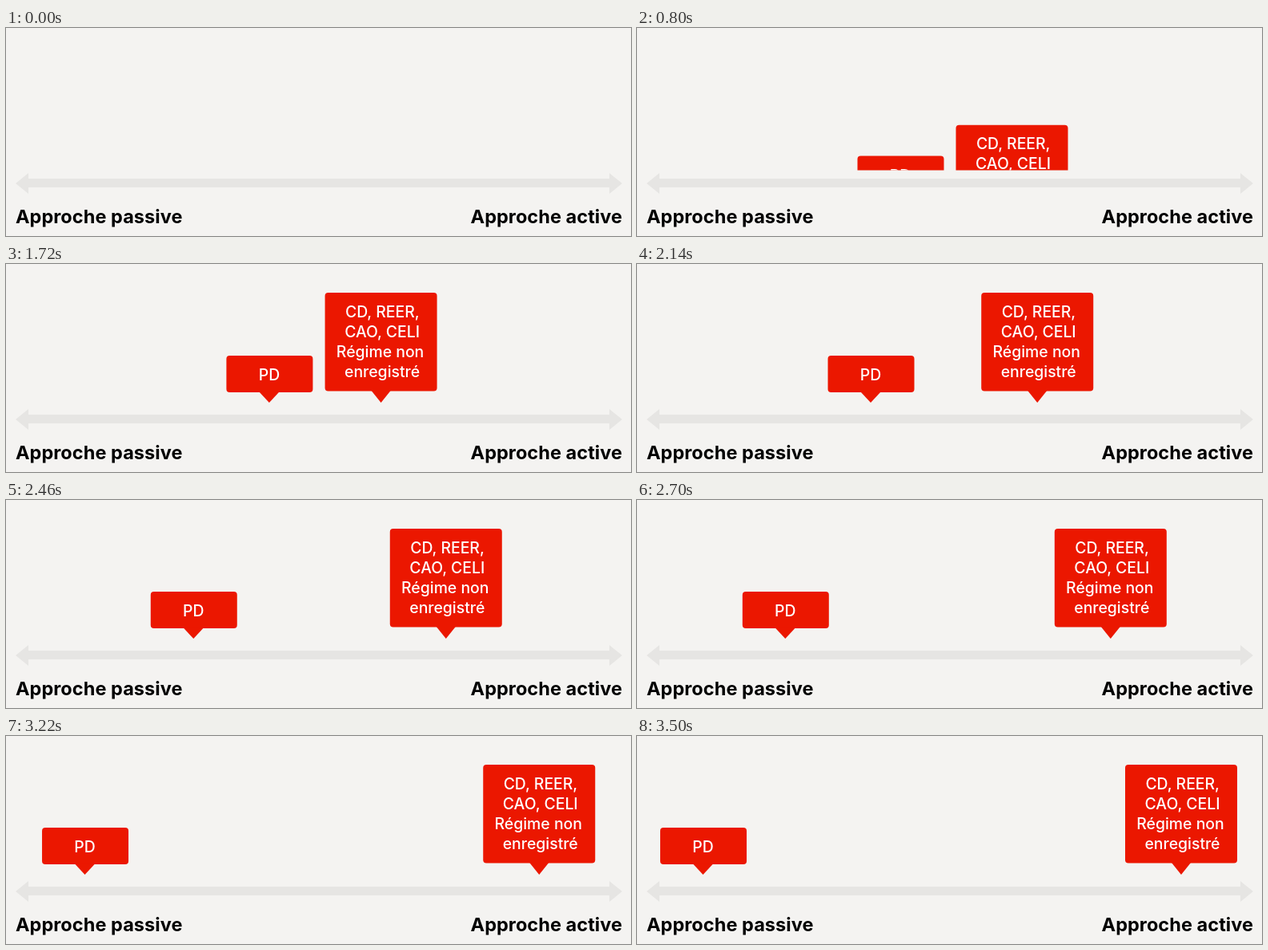
An HTML page for the animation above (3600 ms loop, 781 by 261 pixels).

```html
<!DOCTYPE html>
<html lang="fr">
<head>
<meta charset="utf-8">
<title>Approche passive, approche active</title>
<style>
  html, body { margin: 0; width: 100%; height: 100%; overflow: hidden; background: #f4f3f1; }
  svg { display: block; width: 781px; height: 261px; font-family: Inter, sans-serif; }
  .axis { fill: #e6e5e3; }
  .label { font-size: 23.5px; font-weight: 700; letter-spacing: .05px; }
  .bubble { fill: #eb1700; }
  .bubble text { fill: #fff; font-size: 19.4px; font-weight: 500; text-anchor: middle; }
</style>
</head>
<body>
<svg viewBox="0 0 781 261">
  <clipPath id="above"><path d="M0 0H781V178.500H0Z"/></clipPath>
  <path class="axis" d="M12 195L28 182V189H754V182L770 195L754 208V200H28V208Z"/>
  <text class="label" x="12" y="245">Approche passive</text>
  <text class="label" x="770" y="245" text-anchor="end">Approche active</text>
  <g clip-path="url(#above)">
    <g class="bubble" id="passive">
      <rect y="115" width="108" height="46" rx="4"/>
      <path d="M41 160.500H66L53.500 174Z"/>
      <text x="53.500" y="146">PD</text>
    </g>
    <g class="bubble" id="active">
      <rect y="36" width="140" height="123.500" rx="4"/>
      <path d="M58 159H82L70 174Z"/>
      <text x="71.700" y="66.500">CD, REER,</text>
      <text x="71.500" y="91.500">CAO, CELI</text>
      <text x="69" y="116.500">Régime non</text>
      <text x="71.500" y="141.500">enregistré</text>
    </g>
  </g>
</svg>
<script>
  const LOOP = 3600;
  const bubbles = [
    { id: "passive", from: 275.5, to: 29, drop: 75.7 },
    { id: "active", from: 398.5, to: 610, drop: 142.7 },
  ].map(b => ({ ...b, node: document.getElementById(b.id) }));

  const progress = (t, start, end) => Math.min(1, Math.max(0, (t - start) / (end - start)));
  const smooth = u => u * u * (3 - 2 * u);

  // cubic-bezier(.2, 0, .8, 1), solved by bisection
  function easeRise(x) {
    let low = 0, high = 1;
    for (let i = 0; i < 24; i++) {
      const s = (low + high) / 2, r = 1 - s;
      if (.6 * s * r * r + 2.4 * s * s * r + s ** 3 < x) low = s; else high = s;
    }
    return smooth(high);
  }

  function draw(now) {
    const t = Math.floor(now % LOOP / 20) * 20;
    const rise = easeRise(progress(t, 440, 1300));
    const slide = smooth(progress(t, 1700, 3500));
    for (const { node, from, to, drop } of bubbles) {
      const x = from + (to - from) * slide;
      node.setAttribute("transform", `translate(${x} ${drop * (1 - rise)})`);
      node.setAttribute("visibility", t < 480 ? "hidden" : "visible");
    }
  }

  const began = performance.now();
  function tick() {
    draw(performance.now() - began);
    requestAnimationFrame(tick);
  }
  tick();
</script>
</body>
</html>
```
